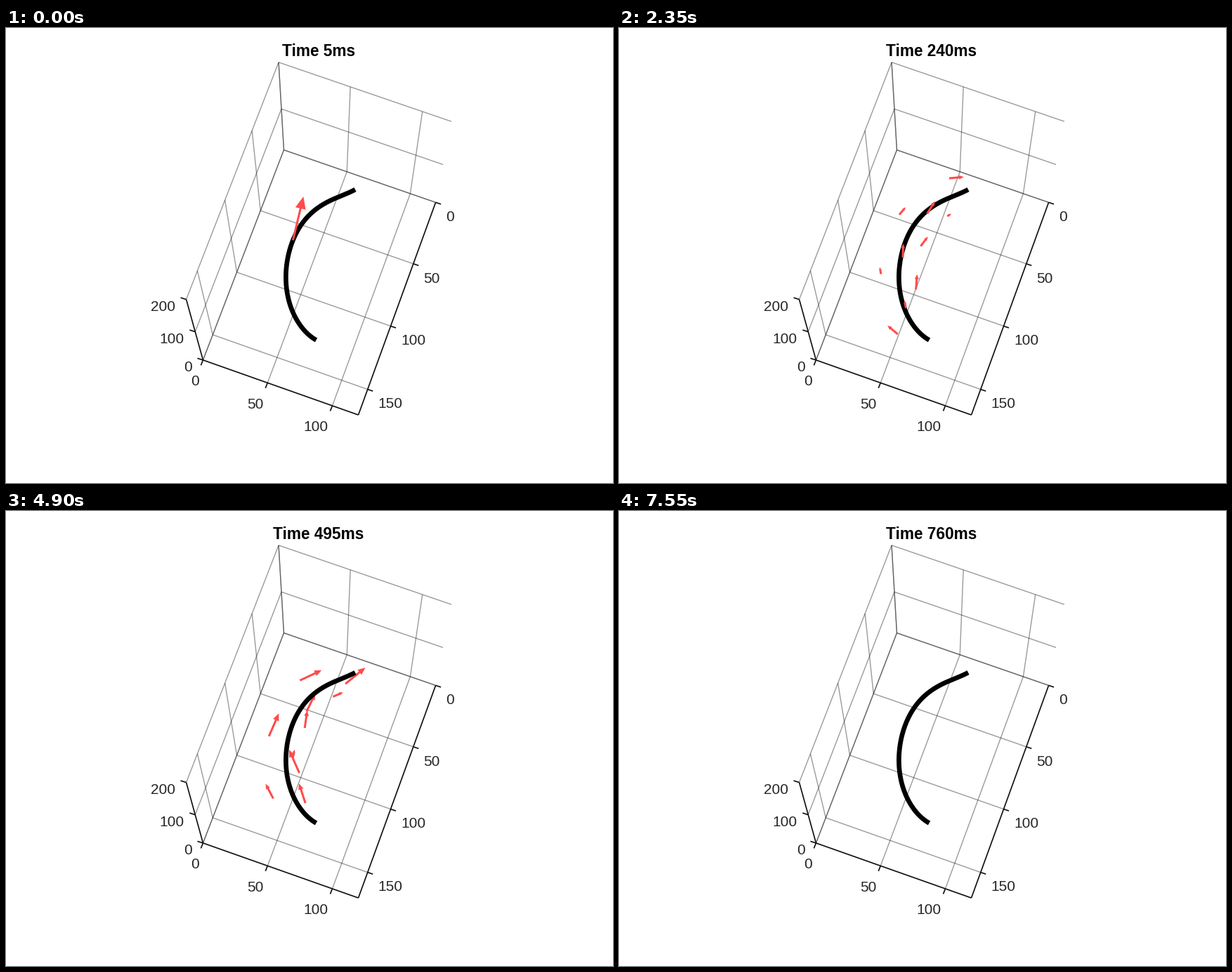
Animation of 864 by 648 pixels, one loop 7600 ms. Source, as a matplotlib script:

```python
from itertools import product

import numpy as np
import matplotlib.pyplot as plt
from matplotlib.animation import FuncAnimation
from matplotlib.collections import LineCollection, PolyCollection

W, H, DPI = 864, 648, 100
FRAMES, STEP = 152, 50
PX = 72 / DPI
INK, RED = "#262626", "#ff4b4b"
XMAX, YMAX, ZMAX = 120, 170, 200

plt.rcParams["font.family"] = "Liberation Sans"
fig = plt.figure(figsize=(W / DPI, H / DPI), dpi=DPI, facecolor="white")
ax = fig.add_axes([0, 0, 1, 1])
ax.set_xlim(0, W)
ax.set_ylim(H, 0)
ax.axis("off")


def fit_camera():
    """Perspective matrix from the seven visible corners of the box."""
    corners = product((0, XMAX), (0, YMAX), (0, ZMAX))
    seen = [(395.5, 173.5), (388, 49), (280.5, 473), (256.5, 386.5),
            (611.5, 248.5), (634, 133), (501.5, 551)]
    rows, rhs = [], []
    for corner, (u, v) in zip(corners, seen):
        p = np.r_[corner, 100] / 100
        o = np.zeros(4)
        rows += [np.r_[p, o, -u * p[:3]], np.r_[o, p, -v * p[:3]]]
        rhs += [u, v]
    m = np.linalg.lstsq(np.array(rows), np.array(rhs), rcond=None)[0]
    return np.append(m, 1).reshape(3, 4)


camera = fit_camera()


def project(x, y, z):
    u, v, w = camera @ (np.array([x, y, z, 100]) / 100)
    return np.array([u / w, v / w])


def lines(segs, width, color, z, **kw):
    coll = LineCollection(segs, linewidths=width * PX, colors=color, zorder=z, **kw)
    coll.set_snap(False)
    return ax.add_collection(coll)


def edge(a, b):
    return project(*a), project(*b)


grid, frame = [], []


def tick(value, point, mark, offset, align):
    p = project(*point)
    frame.append((p, p + mark))
    x, y = p + offset
    ax.text(x, y + 7.5, str(value), size=15, color=INK, ha=align, va="baseline")


for x in range(0, XMAX, 50):
    grid += [edge((x, 0, 0), (x, YMAX, 0)), edge((x, 0, 0), (x, 0, ZMAX))]
    tick(x, (x, YMAX, 0), (-3, 7.5), (-6, 28.7), "right")
for y in range(0, YMAX, 50):
    grid += [edge((0, y, 0), (XMAX, y, 0)), edge((0, y, 0), (0, y, ZMAX))]
    tick(y, (XMAX, y, 0), (7.5, 2.5), (14.6, 19.2), "left")
for z in range(0, ZMAX + 1, 100):
    grid += [edge((0, 0, z), (0, YMAX, z)), edge((0, 0, z), (XMAX, 0, z))]
    tick(z, (0, YMAX, z), (-8, -2.5), (-15.3, 8.8), "right")

near = (0, YMAX, 0)
frame += [edge(near, (XMAX, YMAX, 0)), edge((XMAX, YMAX, 0), (XMAX, 0, 0)),
          edge(near, (0, YMAX, ZMAX))]
lines(grid, 1.4, (0.15, 0.15, 0.15, 0.46), 1)
lines(frame, 1.7, "#111111", 2)

title = ax.text(444.7, 40, "", size=16.3, weight="bold", color="black",
                ha="center", va="baseline")

# Thick curve: complex polynomial x + iy over relative length
knots = np.array([497 + 230j, 470 + 242j, 447 + 254j, 430 + 268j, 407 + 306j,
                  398.5 + 355j, 407 + 402j, 428 + 434j, 441.5 + 444.5j])
dist = np.r_[0, np.cumsum(abs(np.diff(knots)))]
curve = np.polyfit(dist / dist[-1], knots, 6)
path = np.polyval(curve, np.linspace(0, 1, 150))
ax.plot(path.real, path.imag, color="black", lw=6.7 * PX,
        solid_capstyle="butt", zorder=4)

# Arrow bursts: first step, last step, leading site, layer
BURSTS = [(0, 56, 4, 5), (81, 122, 3, 3)]
SITES = np.arange(10)


def burst_arrows(age, left, lead):
    """Tails and vectors: arrows follow the curve, spreading out from the lead."""
    u = 0.07 + 0.09 * SITES
    gap = SITES - lead
    ahead = -np.polyval(np.polyder(curve), u)
    ahead /= abs(ahead)
    side = 28 * np.sin(2.1 * gap + 0.02 * age)
    turn = 0.3 * np.sin(1.7 * SITES + 0.1 * age)
    reach = np.clip(1 + 0.4 * age - abs(gap), 0, 1) * min(left / 12, 1)
    pulse = 0.3 + 0.7 * abs(np.cos(1.3 * gap + 0.05 * age))
    length = (28 + 36 * np.exp(-age / 12)) * pulse * reach
    return np.polyval(curve, u) + 1j * ahead * side, ahead * np.exp(-1j * turn) * length


def xy(*points):
    return [(p.real, p.imag) for p in points]


shafts = lines([], 3, RED, 3, capstyle="butt")
heads = ax.add_collection(PolyCollection([], facecolors=RED, edgecolors="none"))


def update(i):
    title.set_text(f"Time {5 * (i + 1)}ms")
    segs, tris = [], []
    for start, end, lead, layer in BURSTS:
        if not start <= i < end:
            continue
        for tail, vec in zip(*burst_arrows(i - start, end - i, lead)):
            length = abs(vec)
            if length < 3:
                continue
            back = vec / length * (0.25 * length + 1.5)
            tip = tail + vec
            base = tip - back
            segs.append(xy(tail, base + 0.1 * back))
            tris.append(xy(tip, base + 0.43j * back, base - 0.43j * back))
        shafts.set_zorder(layer)
        heads.set_zorder(layer)
    shafts.set_segments(segs)
    heads.set_verts(tris)
    return title, shafts, heads


anim = FuncAnimation(fig, update, frames=FRAMES, interval=STEP,
                     repeat=True, repeat_delay=0, blit=False)
plt.show()
```
